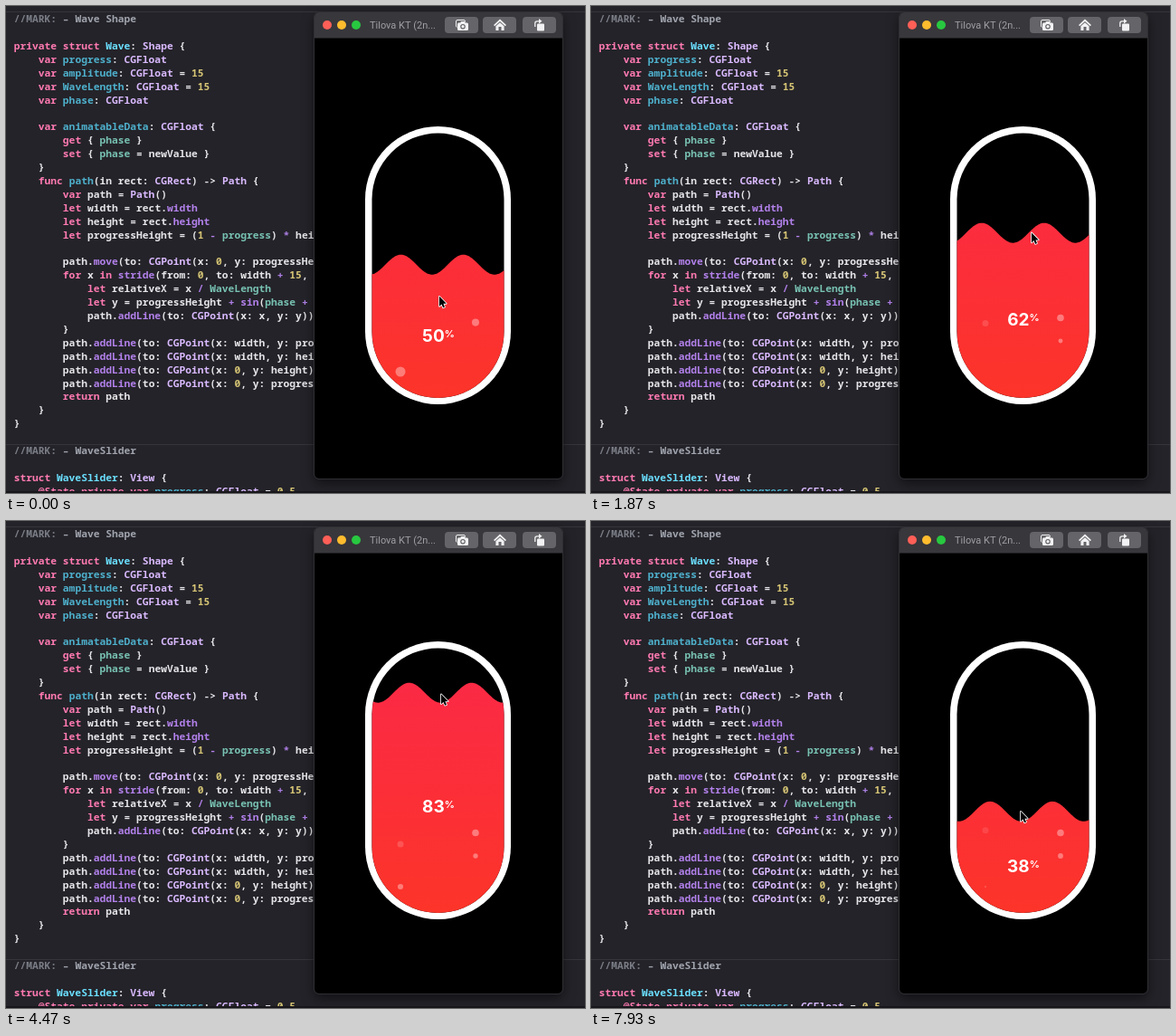
Recreate the animation shown at these times as an HTML page with a canvas. Size 640x538 px, loop 8000 ms.

```html
<!DOCTYPE html>
<html lang="en">
<head>
<meta charset="utf-8">
<title>Wave slider</title>
<style>
html, body { margin: 0; width: 100%; height: 100%; overflow: hidden; background: #242329; }
canvas { display: block; width: 640px; height: 538px; }
</style>
</head>
<body>
<canvas id="stage" width="640" height="538"></canvas>
<script>
const W = 640, H = 538, LOOP = 8000, STEP = 1000 / 15;
const ctx = document.getElementById('stage').getContext('2d');
const clamp = (v, a = 0, b = 1) => Math.min(b, Math.max(a, v));
const smooth = k => k * k * (3 - 2 * k);

const SOURCE = `//MARK: – Wave Shape

private struct Wave: Shape {
    var progress: CGFloat
    var amplitude: CGFloat = 15
    var WaveLength: CGFloat = 15
    var phase: CGFloat

    var animatableData: CGFloat {
        get { phase }
        set { phase = newValue }
    }
    func path(in rect: CGRect) -> Path {
        var path = Path()
        let width = rect.width
        let height = rect.height
        let progressHeight = (1 - progress) * height

        path.move(to: CGPoint(x: 0, y: progressHeight))
        for x in stride(from: 0, to: width + 15, by: 15) {
            let relativeX = x / WaveLength
            let y = progressHeight + sin(phase + relativeX)
            path.addLine(to: CGPoint(x: x, y: y))
        }
        path.addLine(to: CGPoint(x: width, y: progressHeight))
        path.addLine(to: CGPoint(x: width, y: height))
        path.addLine(to: CGPoint(x: 0, y: height))
        path.addLine(to: CGPoint(x: 0, y: progressHeight))
        return path
    }
}

//MARK: – WaveSlider

struct WaveSlider: View {
    @State private var progress: CGFloat = 0.5`;

// First matching rule colours a token
const RULES = [
  [/\/\/MARK:/, '#7b7e87'],
  [/– .*/, '#a0a4ae'],
  [/(?<=struct )\w+/, '#6bdfff'],
  [/(?<=var )\w+(?=:)|(?<=func )\w+/, '#4eb0cc'],
  [/@State|\b(?:private|struct|var|let|func|get|set|for|return)\b|\bin\b(?! rect)/, '#ff7ab2'],
  [/\b(?:CGFloat|CGRect|CGPoint|Shape|Path|View)\b/, '#dabaff'],
  [/\b(?:phase|progress|WaveLength)\b/, '#78c2b3'],
  [/(?<=\.)[a-z]\w+|\bstride\b|\bsin\b|[-+*\/](?= )/, '#b281eb'],
  [/\b\d[\d.]*/, '#d4c374'],
  [/[^\s\w]+?|\w+/, '#e6e6e9']
];
const TOKEN = new RegExp(RULES.map(r => '(' + r[0].source + ')').join('|'), 'g');

function box(c, x, y, w, h, r, fill) {
  c.beginPath();
  c.roundRect(x, y, w, h, r);
  if (fill) { c.fillStyle = fill; c.fill(); }
}

function dot(c, x, y, r, fill) {
  c.beginPath();
  c.arc(x, y, r, 0, 7);
  c.fillStyle = fill;
  c.fill();
}

function drawCode(c) {
  c.fillStyle = '#242329';
  c.fillRect(0, 0, W, H);
  c.fillStyle = '#36353b';
  c.fillRect(0, 6, W, 1);
  c.fillRect(0, 484, W, 1);
  c.font = '600 11.28px "Noto Sans Mono", "DejaVu Sans Mono", monospace';
  SOURCE.split('\n').forEach((line, i) => {
    for (const m of line.matchAll(TOKEN)) {
      c.fillStyle = RULES[m.slice(1).findIndex(g => g !== undefined)][1];
      c.fillText(m[0], 8.7 + m.index * 6.77, 18.2 + i * 14.9);
    }
  });
  c.fillStyle = '#17161a';
  c.fillRect(0, 536, W, 2);
}

function drawIcons(c) {
  const ink = '#f1f1f3', gray = '#656468';
  const shape = d => { c.fillStyle = ink; c.fill(new Path2D(d)); };
  [485, 527, 571].forEach(x => box(c, x, 12, 37, 18, 4, gray));
  c.strokeStyle = ink;
  c.lineWidth = 1;
  // Stacked cameras
  box(c, 497.5, 15.5, 10, 8, 1.5);
  c.stroke();
  box(c, 498.5, 17.5, 13, 10, 2, gray);
  box(c, 499, 18.5, 12, 8.5, 1.5, ink);
  box(c, 502.5, 17, 5, 3, 1, ink);
  dot(c, 505, 22.7, 2.8, gray);
  dot(c, 505, 22.7, 1.6, ink);
  // House
  shape('M546 14.5l7 6.5-1.2 1.2-5.8-5.2-5.8 5.2-1.2-1.2z');
  shape('M546 18.2l4.6 4.1V27h-3.1v-4h-3v4h-3.1v-4.7z');
  // Rotate
  box(c, 587, 19.5, 8, 8, 1, ink);
  c.lineWidth = 1.3;
  c.stroke(new Path2D('M584.8 23v-4q0-2.2 2.2-2.2h3'));
  shape('M589 14l3.5 2.8-3.5 2.8z');
}

function drawWindow(c) {
  c.save();
  c.shadowColor = 'rgba(0,0,0,.55)';
  c.shadowBlur = 14;
  c.shadowOffsetY = 5;
  box(c, 341, 7, 274, 515, 5, '#000');
  c.restore();
  box(c, 341, 7, 274, 28.5, [5, 5, 0, 0], '#38373b');
  box(c, 340.5, 6.5, 275, 516, 5.5);
  c.strokeStyle = '#2f2e33';
  c.lineWidth = 1;
  c.stroke();
  ['#fe5f57', '#febc2e', '#28c840'].forEach((col, i) => dot(c, 355 + 16 * i, 21, 5, col));
  c.font = '11px Roboto, Inter, sans-serif';
  c.fillStyle = '#a09fa3';
  c.fillText('Tilova KT (2n...', 402, 25);
  drawIcons(c);
  box(c, 397, 133, 161, 307, 80.5, '#fff');
  box(c, 404.5, 140.5, 146, 292.5, 73, '#000');
}

const scene = document.createElement('canvas');
scene.width = W;
scene.height = H;
const sceneCtx = scene.getContext('2d');
drawCode(sceneCtx);
drawWindow(sceneCtx);

const redFill = ctx.createLinearGradient(0, 140, 0, 433);
redFill.addColorStop(0, '#fb2849');
redFill.addColorStop(1, '#fc3429');

// Turning points of the drag: seconds, percent, pointer x
const PRESS = .5, LAG = .05;
const DRAG = [
  [PRESS, 38, 479], [1.867, 62, 487], [3.533, 92, 481], [4.9, 80, 481],
  [5.6, 100, 482], [6.26, 98, 480], [7.933, 38, 475]
];

function dragAt(u) {
  const i = clamp(DRAG.findIndex(p => p[0] >= u), 1, DRAG.length - 1);
  const a = DRAG[i - 1], b = u > DRAG.at(-1)[0] ? DRAG.at(-1) : DRAG[i];
  const k = b === DRAG[i] ? smooth(clamp((u - a[0]) / (b[0] - a[0]))) : 1;
  return { pct: a[1] + (b[1] - a[1]) * k, x: a[2] + (b[2] - a[2]) * k };
}

const yOf = pct => 432 - 2.925 * pct;

function bubble(x, y, r, alpha) {
  if (r > 0 && alpha > 0) dot(ctx, x, y, r, `rgba(255,255,255,${alpha})`);
}

// Each bubble swells in place, then rises and fades
function drawBubbles(u) {
  for (let k = -2; k < 10; k++) {
    const left = u - (k - .49 + .35 * Math.cos((k - 2) * Math.PI / 3));
    const climb = clamp((left - .77) * 130, 0, 88);
    bubble(436, 404 - climb, Math.min(10 * left, 5.5 - 2 * clamp(climb / 23)), .36 * (1 - climb / 88));

    const right = u - (.86 * k - .1);
    const hop = clamp((right - .7) / .2);
    bubble(519, 370 - 25.5 * hop, Math.min(10 * right, 5 - 1.2 * hop), .36 * clamp((1.55 - right) / .15));
  }
}

function drawLiquid(u, pct) {
  const level = yOf(pct);
  const crest = 450.3 + 138 * u;
  ctx.save();
  box(ctx, 404.5, 140.5, 146, 292.5, 73);
  ctx.clip();
  ctx.beginPath();
  ctx.moveTo(404, 434);
  for (let x = 404; x <= 552; x++) {
    ctx.lineTo(x, level - 11 * Math.cos((x - crest) * Math.PI * 2 / 69));
  }
  ctx.lineTo(552, 434);
  ctx.fillStyle = redFill;
  ctx.fill();
  ctx.clip();
  drawBubbles(u);
  ctx.restore();
}

function drawLabel(pct) {
  const base = 297.3 + 1.465 * (100 - pct);
  const num = String(Math.round(pct));
  const big = '700 19px Inter, sans-serif', small = '700 11px Inter, sans-serif';
  ctx.font = small;
  const sw = ctx.measureText('%').width;
  ctx.font = big;
  const bw = ctx.measureText(num).width;
  const x = 478 - (bw + sw) / 2;
  ctx.fillStyle = '#fff';
  ctx.fillText(num, x, base);
  ctx.font = small;
  ctx.fillText('%', x + bw, base - 5);
}

const arrow = new Path2D('M0 0v11l2.5-2.3 1.7 3.8 1.8-.8L4.4 8h3.4z');

function drawPointer(x, y) {
  ctx.save();
  ctx.translate(x, y);
  ctx.lineJoin = 'round';
  ctx.lineWidth = 1.6;
  ctx.strokeStyle = '#fff';
  ctx.stroke(arrow);
  ctx.fillStyle = '#000';
  ctx.fill(arrow);
  ctx.restore();
}

function frame(now) {
  const step = Math.floor((now % LOOP + 4) / STEP) % 120;
  // The picture hitches briefly before the drag starts
  const u = step < 6 ? Math.min(step, 2) / 15 - .1 : step / 15;
  const pct = u < PRESS ? 50 : dragAt(u).pct;
  const hand = dragAt(u + LAG);
  ctx.drawImage(scene, 0, 0);
  drawLiquid(u, pct);
  drawLabel(pct);
  drawPointer(hand.x, yOf(hand.pct));
  requestAnimationFrame(frame);
}
requestAnimationFrame(frame);
</script>
</body>
</html>
```
